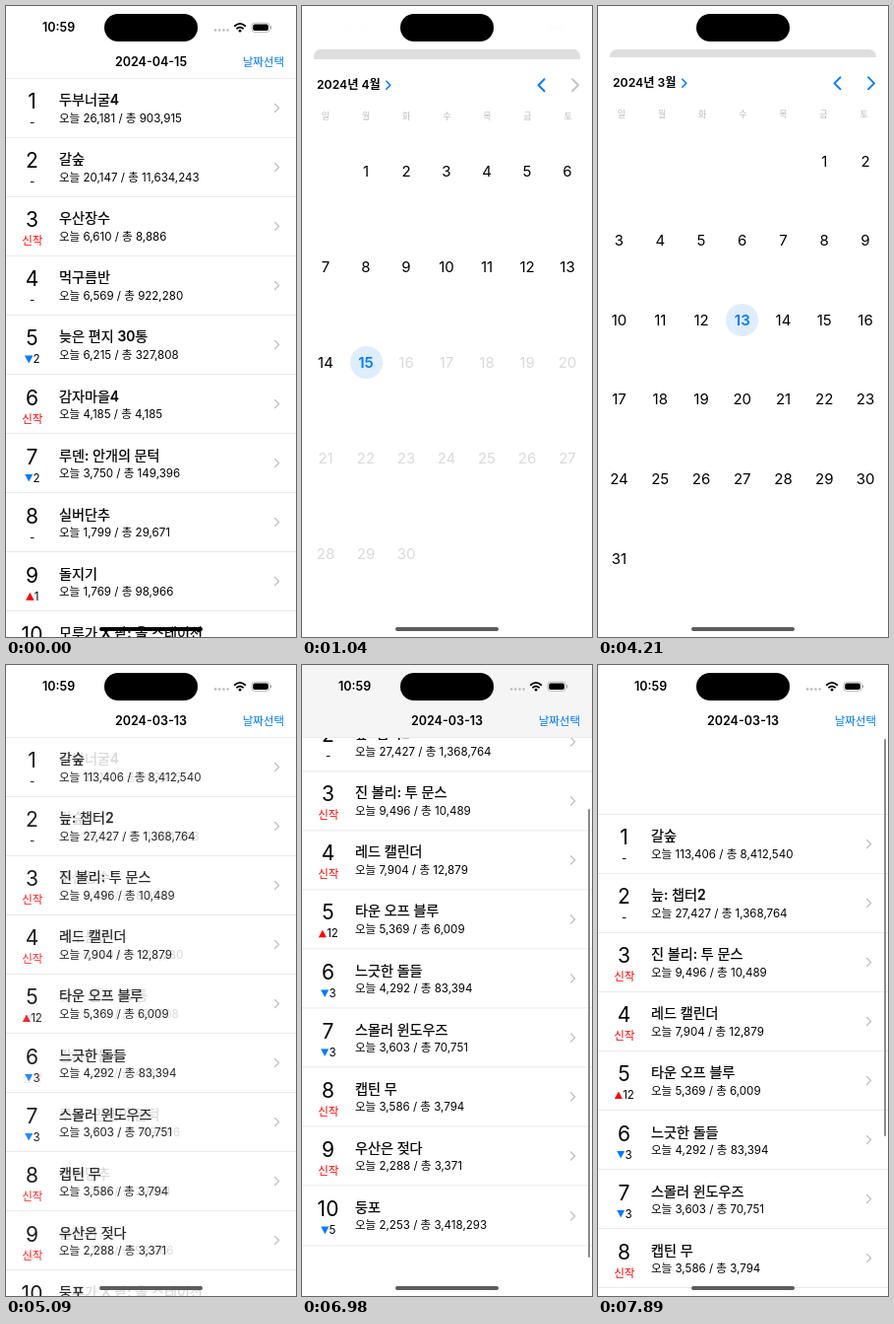
Write an HTML page that moves like this. It is 295x640 px and loops after 8 s.

```html
<!DOCTYPE html>
<html lang="ko">
<head>
<meta charset="utf-8">
<title>일별 순위</title>
<style>
html, body { margin: 0; width: 100%; height: 100%; overflow: hidden; background: #fff; }
#stage { position: relative; width: 295px; height: 640px; overflow: hidden; background: #fff; color: #000;
  font: 11.55px/20px Inter, "Noto Sans CJK KR", "Noto Sans CJK", sans-serif; white-space: nowrap; }
#stage div, #stage svg { position: absolute; }
#screen { inset: 0; background: #fff; overflow: hidden; transform-origin: 50% 0; }
#scroller { left: 0; top: 73px; width: 295px; height: 601px; }
.fill { inset: 0; }
.row { left: 0; width: 295px; height: 60px; }
.line { left: 0; width: 295px; height: 1px; background: #eaeaea; }
.rank { left: 0; top: 14px; width: 53px; text-align: center; font-size: 21px; }
.change { left: 0; top: 35px; width: 53.5px; text-align: center; }
.new { color: #f00; }
.name { left: 54px; top: 12px; font-size: 14.1px; font-weight: 500; -webkit-text-stroke: .25px; }
.count { left: 54px; top: 30.5px; }
.tri { display: inline-block; width: 8.5px; height: 8px; }
.up { background: #f00; clip-path: polygon(50% 0, 100% 100%, 0 100%); }
.down { background: #007aff; clip-path: polygon(0 0, 100% 0, 50% 100%); }
#nav { left: 0; top: 0; width: 295px; height: 73px; }
#edge { top: 72.5px; }
#date { left: 0; width: 295px; top: 47px; text-align: center; font-size: 12.5px; font-weight: 600; }
#pick { right: 12px; top: 47px; color: #007aff; font-size: 11.5px; }
#bar { left: 290.5px; width: 2.25px; border-radius: 2px; background: #8c8c8c; }
#dim { inset: 0; background: #000; }
#clock { left: 37px; top: 12px; font-size: 12.5px; font-weight: 600; }
#sheet { left: 0; top: 52px; width: 295px; height: 600px; background: #fff; border-radius: 8px 8px 0 0; overflow: hidden; }
#month { left: 15px; top: 16px; font-size: 12.2px; font-weight: 600; }
.weekday { width: 30px; top: 48px; text-align: center; font-size: 9px; font-weight: 500; color: #bbb; }
.page { left: 0; top: 0; width: 295px; height: 600px; }
.day { width: 33px; height: 33px; line-height: 33px; border-radius: 50%; text-align: center; font-size: 15px; }
.off { color: #dadada; }
.on { color: #007aff; background: #deedff; font-weight: 600; }
#island { left: 100.2px; top: 8.3px; width: 94.6px; height: 27.8px; border-radius: 14px; background: #000; }
#home { left: 95.3px; top: 629.9px; width: 104.4px; height: 3.8px; border-radius: 2px; }
path { fill: none; stroke-linecap: round; stroke-linejoin: round; }
</style>
</head>
<body>
<div id="stage">
  <div id="screen">
    <div id="scroller">
      <div id="lines" class="fill"></div>
      <div id="before" class="fill"></div>
      <div id="after" class="fill"></div>
    </div>
    <div id="nav">
      <div id="date"></div>
      <div id="pick">날짜선택</div>
      <div id="edge" class="line"></div>
    </div>
    <div id="bar"></div>
    <div id="dim"></div>
  </div>
  <div id="status" class="fill">
    <div id="clock">10:59</div>
    <svg width="295" height="44">
      <g fill="#bbb"><circle cx="213" cy="24.5" r="1.3"/><circle cx="217.2" cy="24.5" r="1.3"/><circle cx="221.4" cy="24.5" r="1.3"/><circle cx="225.6" cy="24.5" r="1.3"/></g>
      <g stroke="#000" stroke-width="1.8"><path d="M232.7 20.2Q238 15.6 243.3 20.2"/><path d="M235 22.8Q238 20.4 241 22.8"/></g>
      <circle cx="238" cy="25.2" r="1.4"/>
      <rect x="249.8" y="17.2" width="18.4" height="9.2" rx="3" fill="none" stroke="#aaa" stroke-width=".8"/>
      <rect x="251.2" y="18.6" width="15.6" height="6.4" rx="1.8"/>
      <rect x="269" y="20.2" width="1.2" height="3.2" rx=".6" fill="#aaa"/>
    </svg>
  </div>
  <div id="sheet">
    <div id="month"></div>
    <svg width="295" height="50">
      <path d="M85.8 22.3l4 4-4 4" stroke="#007aff" stroke-width="1.6"/>
      <path id="prev" d="M246.5 20.3l-6 6 6 6" stroke="#007aff" stroke-width="1.9"/>
      <path id="next" d="M275 20.3l6 6-6 6" stroke-width="1.9"/>
    </svg>
    <div id="april" class="page"></div>
    <div id="march" class="page"></div>
    <div id="picked" class="page"></div>
  </div>
  <div id="island"></div>
  <div id="home"></div>
</div>
<script>
const $ = id => document.getElementById(id);
const clamp = (v, lo = 0, hi = 1) => Math.min(hi, Math.max(lo, v));

const ROW = 60.1, MAX_SCROLL = 59.7, LOOP = 8000;

// name | today | total | change (n: new entry, u/d: places up or down)
const aprilChart = `두부너굴4|26,181|903,915|-
갈숲|20,147|11,634,243|-
우산장수|6,610|8,886|n
먹구름반|6,569|922,280|-
늦은 편지 30통|6,215|327,808|d2
감자마을4|4,185|4,185|n
루덴: 안개의 문턱|3,750|149,396|d2
실버단추|1,799|29,671|-
돌지기|1,769|98,966|u1
모루가 X 팥: 올 스테이션|1,512|2,018,340|-`;
const marchChart = `갈숲|113,406|8,412,540|-
늪: 챕터2|27,427|1,368,764|-
진 볼리: 투 문스|9,496|10,489|n
레드 캘린더|7,904|12,879|n
타운 오프 블루|5,369|6,009|u12
느긋한 돌들|4,292|83,394|d3
스몰러 윈도우즈|3,603|70,751|d3
캡틴 무|3,586|3,794|n
우산은 젖다|2,288|3,371|n
둥포|2,253|3,418,293|d5`;

function changeMark(code) {
  if (code === '-') return '-';
  if (code === 'n') return '<span class="new">신작</span>';
  return `<span class="tri ${code[0] === 'u' ? 'up' : 'down'}"></span>${code.slice(1)}`;
}

function fillChart(id, chart) {
  $(id).innerHTML = chart.split('\n').map((entry, i) => {
    const [name, today, total, change] = entry.split('|');
    return `<div class="row" style="top:${i * ROW}px"><div class="rank">${i + 1}</div>
      <div class="change">${changeMark(change)}</div><div class="name">${name}</div>
      <div class="count">오늘 ${today} / 총 ${total}</div></div>`;
  }).join('');
}

function fillMonth(id, { first, days, x, dx, y, dy, selected, lastActive }) {
  let html = '';
  for (let d = 1; d <= days; d++) {
    const cell = first + d - 1;
    const left = x + dx * (cell % 7) - 16.5, top = y + dy * Math.floor(cell / 7) - 68.5;
    const kind = d === selected ? 'on' : d > lastActive ? 'off' : '';
    html += `<div class="day ${kind}" style="left:${left}px;top:${top}px">${d}</div>`;
  }
  $(id).innerHTML = html;
}

fillChart('before', aprilChart);
fillChart('after', marchChart);
for (let i = 0; i <= 10; i++) {
  $('lines').innerHTML += `<div class="line" style="top:${i * ROW - .5}px"></div>` + (i < 10 ?
    `<svg style="left:270px;top:${i * ROW + 19.6}px" width="12" height="20"><path d="M3.5 6.4l4.1 4.1-4.1 4.1" stroke="#c4c4c6" stroke-width="1.4"/></svg>` : '');
}
[...'일월화수목금토'].forEach((name, i) => {
  $('sheet').insertAdjacentHTML('beforeend', `<div class="weekday" style="left:${9 + 41.1 * i}px">${name}</div>`);
});
const fiveWeeks = { x: 24, dx: 41, y: 165, dy: 97 };
fillMonth('april', { ...fiveWeeks, first: 1, days: 30, selected: 15, lastActive: 15 });
fillMonth('march', { ...fiveWeeks, first: 5, days: 31, lastActive: 31 });
fillMonth('picked', { x: 21.5, dx: 41.75, y: 157, dy: 80.65, first: 5, days: 31, selected: 13, lastActive: 31 });

// The picture only refreshes at these moments: [from, to, count]
const ticks = [[0, 0, 1], [500, 1040, 6], [2590, 2590, 1], [2730, 2940, 3], [4210, 4980, 8],
  [5090, 5090, 1], [6660, 6980, 4], [7090, 7440, 4], [7570, 7890, 4]]
  .flatMap(([from, to, n]) => Array.from({ length: n }, (_, k) => Math.floor(from + (to - from) * k / Math.max(1, n - 1))));
const lastTick = t => ticks.filter(tick => tick <= t).pop();

// Critically damped spring from 0 to 1
function spring(t, start) {
  const x = Math.max(0, t - start) * .0175;
  return 1 - (1 + x) * Math.exp(-x);
}

const scrollPath = [[6640, 0], [6770, 32], [6880, 68], [6980, 85.6], [7090, 70], [7200, 56], [7310, 26], [7440, 0],
  [7530, 0], [7680, -36], [7790, -63], [7890, -78]];
function scrollAt(t) {
  if (t <= scrollPath[0][0]) return 0;
  const i = scrollPath.findIndex(([time]) => time >= t);
  if (i < 0) return scrollPath[scrollPath.length - 1][1];
  const [t0, s0] = scrollPath[i - 1], [t1, s1] = scrollPath[i];
  return s0 + (s1 - s0) * (t - t0) / (t1 - t0);
}

function drawList(t) {
  const scroll = scrollAt(t);
  const fade = t >= 6660 ? 1 : clamp((t - 4870) / 260);
  $('scroller').style.transform = `translateY(${-scroll}px)`;
  $('before').style.opacity = 1 - fade;
  $('after').style.opacity = fade;
  $('nav').style.background = scroll > 0 ? '#f5f5f5' : '#fff';
  $('edge').style.display = scroll < 0 ? 'none' : '';
  $('date').textContent = t < 4210 ? '2024-04-15' : '2024-03-13';
  $('pick').style.opacity = t >= 500 && t < 700 ? .4 : 1;

  const inside = clamp(scroll, 0, MAX_SCROLL), over = scroll - inside;
  const bar = $('bar').style;
  bar.display = t >= 6660 ? '' : 'none';
  bar.top = 75 + 45 * inside / MAX_SCROLL + Math.max(0, over) + 'px';
  bar.height = 481 - Math.abs(over) + 'px';
}

function drawSheet(t) {
  const open = t < 4210 ? spring(t, 590) : 1 - spring(t, 4370);
  $('sheet').style.transform = `translateY(${588 * (1 - open)}px)`;
  $('screen').style.transform = `translateY(${44 * open}px) scale(${1 - .0814 * open})`;
  $('screen').style.borderRadius = 8 * open + 'px';
  $('dim').style.opacity = .13 * open;
  $('status').style.opacity = 1 - open;

  const slide = 1 - (1 - clamp((t - 2700) / 240)) ** 3;
  const inMarch = t >= 2730, picked = t >= 4210;
  $('april').style.transform = `translateX(${295 * slide}px)`;
  $('march').style.transform = `translateX(${295 * (slide - 1)}px)`;
  $('march').style.display = picked ? 'none' : '';
  $('picked').style.display = picked ? '' : 'none';
  $('month').textContent = inMarch ? '2024년 3월' : '2024년 4월';
  $('prev').style.opacity = t >= 2590 && t < 2730 ? .8 : 1;
  $('next').style.stroke = inMarch ? '#007aff' : '#c4c4c6';
}

const start = performance.now();
function frame() {
  const t = lastTick((performance.now() - start) % LOOP);
  drawList(t);
  drawSheet(t);
  $('home').style.background = t < 500 ? '#000' : '#5c5c5c';
  requestAnimationFrame(frame);
}
frame();
</script>
</body>
</html>
```
